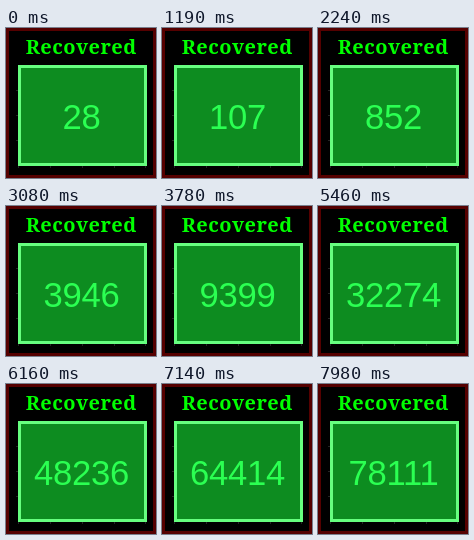
Recreate the animation shown at these times as an HTML page. Size 150 by 150 pixels, loop 8 s.

```html
<!DOCTYPE html>
<html lang="en">
<head>
<meta charset="utf-8">
<title>Recovered</title>
<style>
  html, body { margin: 0; width: 100%; height: 100%; overflow: hidden; background: #000; }
  svg { display: block; width: 100vw; height: 100vh; }
  text { text-anchor: middle; font-kerning: none; }
  .title { font: bold 20px "Noto Serif", serif; letter-spacing: 0.45px; fill: #00ff00; }
  .count { font: 34.67px "Liberation Sans", Arial, sans-serif; letter-spacing: -0.28px; fill: #2bff52; }
</style>
</head>
<body>
<svg viewBox="0 0 150 150">
  <rect x="1.5" y="1.5" width="147" height="147" fill="#000" stroke="#550000" stroke-width="3"/>
  <path d="M10 62.5h2M10 87.5h2M10 112.5h2M12.5 138v2M44.5 138v2M76.5 138v2M108.5 138v2M139.5 138v2" stroke="#262626"/>
  <rect x="13.5" y="38.5" width="126" height="98" fill="#0d8c20" stroke="#66ff7f" stroke-width="3"/>
  <text class="title" x="75.2" y="26">Recovered</text>
  <text class="count" x="75.5" y="101">28</text>
</svg>
<script>
  const LOOP = 8000;
  // [day, total], with steady exponential growth in between
  const milestones = [
    [0, 28], [5, 61], [6, 107], [13, 852], [19, 3946],
    [24, 9399], [32, 23401], [41, 48236], [48, 64414], [54, 78111]
  ];
  const count = document.querySelector(".count");

  // The first days pass more slowly than the rest.
  function dayAt(t) {
    if (t < 140) return 0;
    if (t < 1400) return 1 + Math.floor((t - 140) / 210);
    return 7 + Math.floor((t - 1400) / 140);
  }

  function totalOn(day) {
    const next = Math.max(1, milestones.findIndex(([d]) => d >= day));
    const [d0, n0] = milestones[next - 1];
    const [d1, n1] = milestones[next];
    return Math.round(n0 * (n1 / n0) ** ((day - d0) / (d1 - d0)));
  }

  function draw() {
    count.textContent = totalOn(dayAt(performance.now() % LOOP));
    requestAnimationFrame(draw);
  }
  draw();
</script>
</body>
</html>
```
